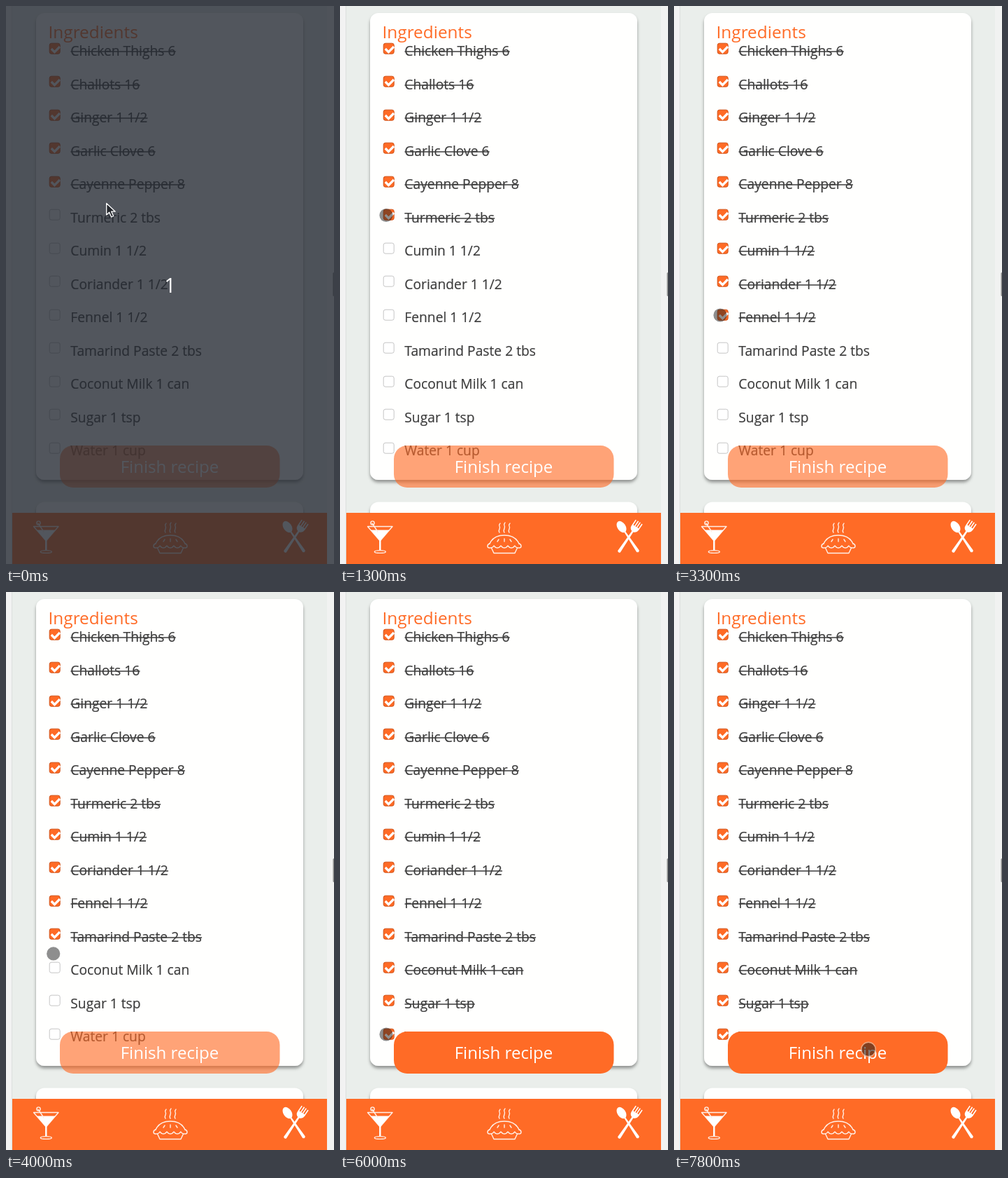
An HTML page for the animation above (8 s loop, 469 by 796 pixels).

```html
<!DOCTYPE html>
<html lang="en">
<head>
<meta charset="utf-8">
<title>Ingredients</title>
<style>
  html, body { margin: 0; width: 100%; height: 100%; overflow: hidden; background: #eaeeeb; }
  svg { display: block; width: 100%; height: 100%; }
  text { font-family: "Open Sans", "Noto Sans", sans-serif; }
  .item { font-size: 19.25px; fill: #3d3d3d; stroke: #3d3d3d; stroke-width: .2px; }
  .icon { fill: none; stroke: #fff0e8; stroke-width: 1.4; stroke-linecap: round; stroke-linejoin: round; }
  .solid { fill: #fff; stroke: none; }
</style>
</head>
<body>
<svg viewBox="0 0 469 796">
  <defs>
    <filter id="shadow" x="-10%" y="-10%" width="120%" height="120%">
      <feDropShadow dx="0" dy="3.5" stdDeviation="2.2" flood-color="#000" flood-opacity=".38"/>
    </filter>
  </defs>

  <rect width="469" height="796" fill="#eaeeeb"/>
  <rect width="8.5" height="796" fill="#f2f2f2"/>
  <rect x="8" width="1" height="796" fill="#dcdfdd"/>
  <rect x="459" width="10" height="796" fill="#f1f2f1"/>
  <rect x="467.5" y="380" width="4" height="34" rx="1.5" fill="#8b8b8b"/>

  <g fill="#fffffe" filter="url(#shadow)">
    <rect x="43" y="10" width="382" height="666" rx="12"/>
    <rect x="43" y="707.5" width="382" height="60" rx="12"/>
  </g>

  <text x="60.5" y="46" font-size="24.4" fill="#ff6b26">Ingredients</text>
  <g id="list"></g>

  <rect id="button" x="77" y="627" width="314.5" height="60" rx="19" fill="#ff6b26"/>
  <text x="234" y="666" font-size="24.1" fill="#fff" text-anchor="middle">Finish recipe</text>

  <rect x="9" y="723" width="450" height="73" fill="#ff6b26"/>

  <g class="icon">
    <path d="M39.5 742.5H75L57.3 763Z"/>
    <path class="solid" d="M44 747.5H70.5L58.5 762V776H56.1V762Z"/>
    <path d="M46 738 54 750"/>
    <circle cx="46.5" cy="737.5" r="2.6"/>
    <ellipse cx="57.3" cy="778.5" rx="8" ry="1.9"/>
  </g>

  <g class="icon">
    <path d="M228 751c-3-4 2.5-5 0-9q-1-2 1-4M235 751c-3-4 2.5-6 0-10q-1-2 1-4M242 751c-3-4 2.5-5 0-9q-1-2 1-4"/>
    <path d="M214 767C218 758 226 755 235 755S252 758 256 767"/>
    <path d="M214 767c-4 1-4 6 0 6 3 0 5-1 6-3 3 4 7 4 10 0 3 4 7 4 10 0 3 4 7 4 10 0 1 2 3 3 6 3 4 0 4-5 0-6"/>
    <path d="M216.5 773l3.5 7.500H250l3.500-7.500M227 761l-2 3M235 760v4M243 761l2 3"/>
  </g>

  <g class="solid">
    <g transform="translate(402.5 743) rotate(-34)">
      <ellipse rx="5.900" ry="9"/>
      <path d="M-1 8H1L2.200 42Q0 45-2.200 42Z"/>
    </g>
    <g transform="translate(422.5 743.5) rotate(34)">
      <path d="M-6-9h1.600V-1h2.100V-9.500h1.600V-1H1V-9.500h1.600V-1H4.600V-9h1.600V1Q6 6 1.200 7.500L2.200 42Q0 45-2.200 42L-1.200 7.500Q-6 6-6 1Z"/>
    </g>
  </g>

  <g id="dot">
    <circle r="9.600" fill="#1e1e1e" fill-opacity=".5"/>
    <circle id="ring" r="10.300" fill="#1e1e1e" fill-opacity=".12" stroke="#e3b79c" stroke-opacity=".75" stroke-width="1.500"/>
  </g>

  <g id="intro">
    <rect width="469" height="796" fill="#242932" fill-opacity=".79"/>
    <text x="234.500" y="409" font-size="29" fill="#fff" text-anchor="middle">1</text>
    <path transform="translate(143.700 281.500)" d="M0 0V16.500L4 12.800 7 19.500 10 18.200 7 11.700H12.500Z"
      fill="#24272c" stroke="#fff" stroke-width="1.300" stroke-linejoin="round"/>
  </g>
</svg>

<script>
const LOOP = 8000, TICK = 100, PITCH = 47.5;
const INTRO_END = 100, PRESS = 7800, FIRST = 5;
const $ = id => document.getElementById(id);

const items = ["Chicken Thighs 6", "Challots 16", "Ginger 1 1/2", "Garlic Clove 6",
  "Cayenne Pepper 8", "Turmeric 2 tbs", "Cumin 1 1/2", "Coriander 1 1/2", "Fennel 1 1/2",
  "Tamarind Paste 2 tbs", "Coconut Milk 1 can", "Sugar 1 tsp", "Water 1 cup"];
// When each row from FIRST on is ticked
const ticks = [1300, 2100, 2600, 3300, 3900, 4500, 5100, 6000];
const allDone = ticks[ticks.length - 1];

// Pointer places before and after the list
const home = [143.3, 283.3], edge = [220, 645], goal = [278, 652.5];

const clamp = k => Math.min(1, Math.max(0, k));
const easeOut = k => 1 - (1 - clamp(k)) ** 3;
const bump = k => Math.sin(Math.PI * clamp(k));
const rowPoint = row => [66, 61 + row * PITCH];

// Point on the way from a to b, bulging by dx, dy halfway
function travel(a, b, k, dx = 0, dy = 0, bulge = k) {
  return [a[0] + (b[0] - a[0]) * k + dx * bump(bulge),
          a[1] + (b[1] - a[1]) * k + dy * bump(bulge)];
}

function pointerAt(t) {
  if (t < ticks[0]) return travel(home, rowPoint(FIRST), easeOut((t - INTRO_END) / 900));
  if (t < allDone) {
    const n = ticks.findIndex(time => time > t);
    const since = t - ticks[n - 1], span = ticks[n] - ticks[n - 1];
    const row = FIRST + n - 1;
    return travel(rowPoint(row), rowPoint(row + 1), easeOut(since / 400), 3.5, 0, since / span);
  }
  const out = clamp((t - allDone) / 800);
  if (out < 1) return travel(rowPoint(items.length - 1), edge, out, 0, -56);
  return travel(edge, goal, clamp((t - allDone - 800) / 900), -22, 19);
}

function make(tag, attrs, parent) {
  const el = document.createElementNS("http://www.w3.org/2000/svg", tag);
  for (const key in attrs) el.setAttribute(key, attrs[key]);
  return parent.appendChild(el);
}

const rows = items.map((label, i) => {
  const textY = 71 + Math.ceil(i * PITCH), boxY = 53.5 + Math.floor(i * PITCH);
  const text = make("text", { x: 92.3, y: textY, class: "item" }, $("list"));
  text.textContent = label;
  const box = make("rect", { x: 62.2, y: boxY - 0.3, width: 15, height: 15, rx: 2.8 }, $("list"));
  const done = make("g", { fill: "none" }, $("list"));
  make("path", { d: `M64.800 ${boxY + 7.5}l4.600 4.600 7.600-7.600`, stroke: "#fff", "stroke-width": 3.3 }, done);
  const end = 92.5 + text.getComputedTextLength();
  make("path", { d: `M92.500 ${textY - 6}H${end}`, stroke: "#3d3d3d", "stroke-width": 1.4 }, done);
  return { box, done, time: i < FIRST ? 0 : ticks[i - FIRST] };
});

function show(el, on) {
  el.setAttribute("visibility", on ? "visible" : "hidden");
}

function render(t) {
  for (const { box, done, time } of rows) {
    const on = t >= time;
    box.setAttribute("fill", on ? "#ff6b26" : "#fff");
    box.setAttribute("stroke", on ? "#cf5218" : "#c6c6c6");
    show(done, on);
  }
  $("button").setAttribute("fill-opacity", t >= allDone ? 1 : 0.62);
  $("dot").setAttribute("transform", `translate(${pointerAt(t)})`);
  show($("dot"), t >= INTRO_END);
  show($("ring"), t >= PRESS);
  show($("intro"), t < INTRO_END);
}

const start = performance.now();
function loop() {
  const t = (performance.now() - start) % LOOP;
  render(Math.floor(t / TICK) * TICK);
  requestAnimationFrame(loop);
}
loop();
</script>
</body>
</html>
```
